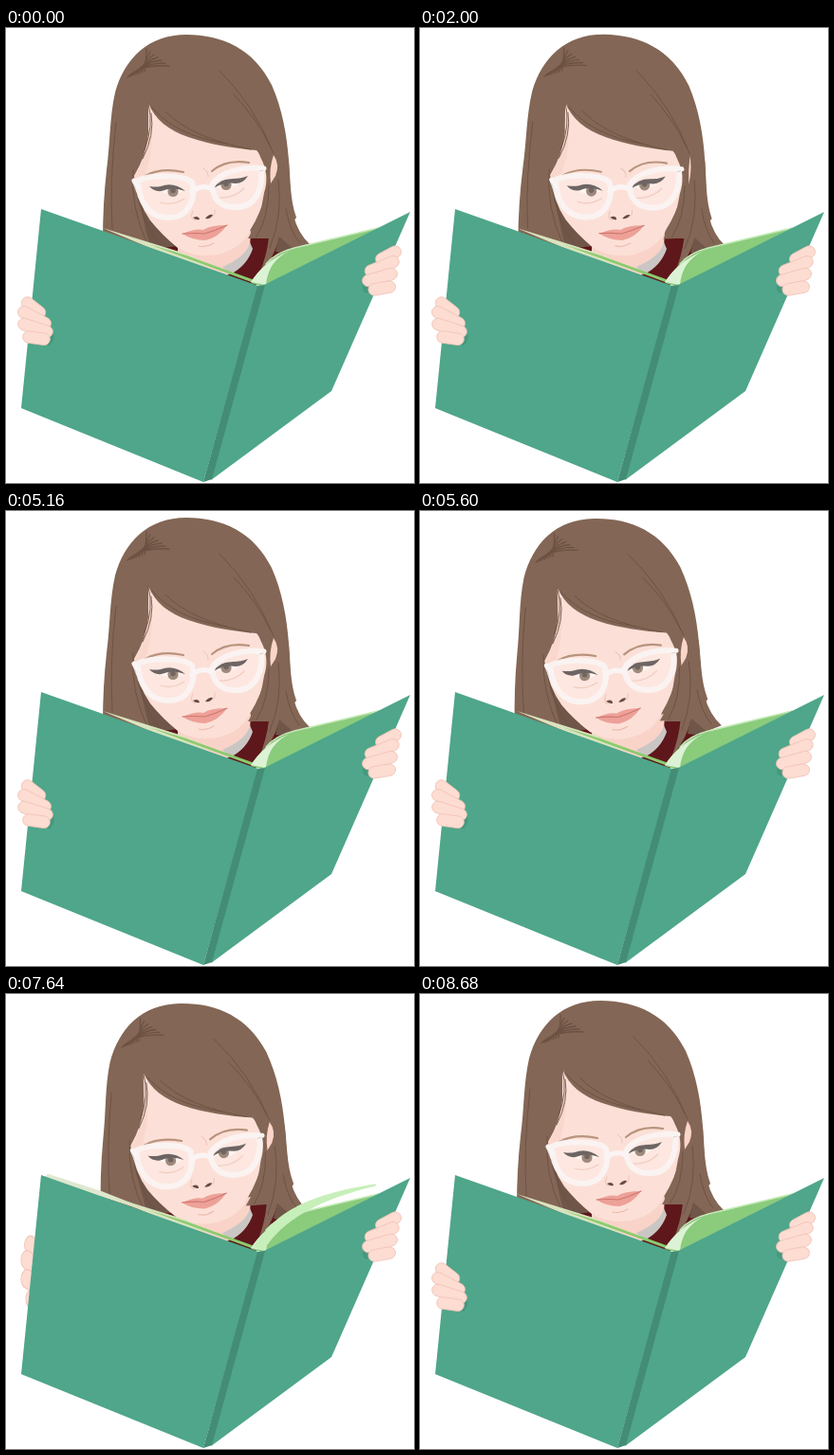
An HTML page that plays this animation: 430x480 px, repeating every 9280 ms.

```html
<!DOCTYPE html>
<html lang="en">
<head>
<meta charset="utf-8">
<title>Girl reading a book</title>
<style>
  html, body { margin: 0; width: 100%; height: 100%; overflow: hidden; background: #fff; }
  svg { display: block; width: 430px; height: 480px; }
  .line { fill: none; stroke-linecap: round; stroke-linejoin: round; }
  .strand { stroke: #6c5143; stroke-width: .9; }
  .frame { fill: #fff; fill-opacity: .22; stroke: #faf5f4; stroke-width: 6; stroke-opacity: .93; stroke-linejoin: round; }
  .finger { fill: #fddcd2; stroke: #f1c3b7; stroke-width: .8; }
  .shadow { fill: #3f8f77; opacity: .6; }
</style>
</head>
<body>
<svg viewBox="0 0 430 480">
  <g id="hairBack">
    <path fill="#836655" d="M190 7C150 7 125 32 115 68C109 95 110 120 106 150Q102 185 102 225L180 262L255 262L306 200C299 180 300 160 298 140C296 112 291 85 280 60C261 22 228 7 190 7Z"/>
    <path fill="#6f5648" d="M139 178L151 228L182 246L182 226Q155 208 139 178Z"/>
    <path class="line strand" d="M134 150Q131 190 149 228M137 165Q141 203 163 231"/>
  </g>

  <path fill="#5e171b" d="M164 232L182 230L182 245ZM226 262L256 222L312 222L300 240L262 272Z"/>
  <path fill="#f9d3c8" d="M181 226L258 214L257 230Q250 248 232 262L181 243Z"/>
  <path fill="#cac6c4" d="M257 226Q254 241 228 252L236 260Q254 251 260 233Z"/>

  <g id="hairFront">
    <path fill="#fce0d7" d="M150 79C157 97 172 108 192 115C215 123 240 127 264 129L270 136Q279 152 275 172Q268 196 258 212Q250 232 223 239Q200 243 181 232Q164 218 152 203Q139 185 135 156Q148 134 150 112Z"/>
    <path fill="#f9d0c5" opacity=".55" d="M135 158Q147 140 150 112L153 100Q157 135 143 165Z"/>
    <path fill="#836655" d="M262 122L269 138Q278 155 272 174Q268 203 255 222L277 221Q275 240 266 262Q283 241 288 222Q296 230 304 234L320 228Q308 217 303 198Q299 175 298 140L290 110Z"/>
    <path fill="#6f5648" d="M288 220L304 234L298 238L284 236Z"/>
    <path id="ear" fill="#fbd5ca" d="M282 134Q289 144 284 156L279 164Q277 148 282 134Z"/>
    <g class="line strand">
      <path id="whorl" stroke-width="1.3"/>
      <path d="M150 79Q156 104 146 128M153 90Q157 113 144 138"/>
      <path d="M154 84Q178 113 232 122M168 88Q195 116 258 128M225 45Q262 82 282 132M240 70Q265 96 279 126"/>
      <path d="M277 166Q277 200 264 220M287 160Q292 198 278 232M295 190Q299 214 309 226M116 100Q109 160 112 212"/>
    </g>
  </g>

  <g id="face">
    <g class="line">
      <path stroke="#b9937d" stroke-width="2.2" d="M147 156Q163 147 187 152M217 151Q232 138 256 142"/>
      <path stroke="#f0c2b5" stroke-width="1" d="M208 148Q214 152 213 157M197 193Q193 201 199 203M220 192Q221 198 217 199"/>
      <path stroke="#edbcae" stroke-width="1.2" d="M163 184Q175 188 188 180M225 179Q240 180 251 169M203 230Q211 232 219 227"/>
    </g>
    <path fill="#fdf0eb" d="M161 171Q174 165 187 172Q175 180 161 171ZM222 168Q232 160 246 163Q237 173 222 168Z"/>
    <g id="eyes">
      <g fill="#826957"><circle cx="176" cy="172.5" r="5.6"/><circle cx="232" cy="165.5" r="5.6"/></g>
      <g fill="#4a3a34"><circle cx="176" cy="171.5" r="2.8"/><circle cx="232" cy="164.5" r="2.8"/></g>
    </g>
    <path fill="#443a38" d="M151 167Q158 168 163 167Q177 162 189 172Q175 167 164 172Q156 173 151 167ZM219 169Q225 159 239 159Q248 159 255 156Q250 164 242 164Q230 162 219 169Z"/>
    <path fill="#6b4a43" d="M197 200Q203 197 204 202Q200 203 197 200ZM210 201Q214 196 218 197Q216 202 210 201Z"/>
    <path fill="#eda198" d="M186 217Q200 211 208 213Q215 208 233 208Q224 221 210 224Q196 224 186 217Z"/>
    <path class="line" stroke="#cf7770" stroke-width="1.2" d="M186 217Q200 216 209 217Q220 214 233 208"/>
    <path class="line" stroke="#dcd8d7" stroke-width="6" d="M136 162L140 172"/>
    <path class="frame" d="M139 161C151 155 187 154 196 163C200 177 195 200 171 200C152 200 140 185 139 161Z"/>
    <path class="frame" d="M217 166C224 152 250 146 269 148C271 166 265 188 244 189C227 190 218 181 217 166Z"/>
    <path class="line" stroke="#faf5f4" stroke-width="5" d="M196 173Q206 164 217 170M135 161L140 168M266 149L272 148"/>
    <path class="line" stroke="#d9d0ce" d="M267 151L271 150"/>
  </g>

  <path id="lift" fill="#dfe8d0" d="M40 193L44 189L100 207L186 241Z"/>
  <path fill="#d9e3bf" d="M102 211L186 237L230 256L180 244Z"/>
  <path fill="#8ccb6e" d="M150 228L190 240L262 266L272 273Z"/>
  <path fill="#8acb7c" d="M258 269Q276 240 302 233L392 211L400 215L272 273Z"/>
  <path class="line" stroke="#c6ebb8" stroke-width="1.4" d="M274 249Q284 237 304 232L392 211"/>
  <path fill="#dcf2d5" d="M258 268Q272 246 299 235Q276 246 274 271Z"/>
  <path id="leaf"/>
  <path id="fold" fill="#d9f1d0" d="M248 268L258 262L270 247L273 271Z"/>

  <g id="handBehind"></g>
  <path fill="#4fa68a" d="M37 191L266 272L208 479L16 401ZM272 271L426 194L343 383L216 477Z"/>
  <path fill="#438c75" d="M265 272L273 271L217 476L208 479Z"/>
  <g id="handFront"><path class="shadow" d="M28 330L46 335Q52 330 50 322Z"/></g>
  <g id="handRight"><path class="shadow" d="M380 264Q373 274 378 279L392 281L392 262Z"/></g>
</svg>

<script>
const LOOP = 9280, STEP = 40;
const $ = id => document.getElementById(id);
const set = (id, name, value) => $(id).setAttribute(name, value);
const move = (id, value) => set(id, 'transform', value);
const show = (id, on) => set(id, 'visibility', on ? 'visible' : 'hidden');

const progress = (t, from, to) => Math.min(1, Math.max(0, (t - from) / (to - from)));
const ramp = (t, from, to) => { const u = progress(t, from, to); return u * u * (3 - 2 * u); };
const bump = (t, from, to) => Math.sin(Math.PI * progress(t, from, to));
const mix = (a, b, u) => a.map((v, i) => v + (b[i] - v) * u);
const add = (a, x, y) => [a[0] + x, a[1] + y];

// Four fingers, the middle two longest; place(i) gives centre and angle.
function addHand(id, place) {
  for (let i = 0; i < 4; i++) {
    const [x, y, angle] = place(i), w = 39 - 4.5 * (i - 1.5) ** 2;
    $(id).innerHTML += `<rect class="finger" x="${-w / 2}" y="-6.3" width="${w}" height="12.6" rx="6.3"
      transform="translate(${x} ${y}) rotate(${angle})"/>`;
  }
}
const leftFinger = i => [29 + i, 295 + 10.7 * i, 38 - 10 * i];
addHand('handBehind', leftFinger);
addHand('handFront', leftFinger);
addHand('handRight', i => [394 + 2.2 * (i - 2) ** 2, 240 + 11.5 * i, 6 * i - 28]);
const index = $('handRight').querySelector('rect');

// Strands fanning out from the parting
let whorl = '';
for (let i = 0; i < 7; i++) whorl += `M${128 + 3 * i} ${52 - i}Q${142 + i} ${38 - i} ${172 - 4 * i} ${40 - 3 * i}`;
set('whorl', 'd', whorl);

function drawHead(t) {
  const back = ramp(t, 7640, 8360);
  const tilt = .7 * (ramp(t, 240, 600) - ramp(t, 3720, 4120)) - 1.2 * (ramp(t, 5160, 5600) - back);
  const drop = 2 * (ramp(t, 6520, 6880) - back) + .5 * (ramp(t, 5160, 5600) - back);
  const gaze = 4 * ramp(t, 1480, 2000) - 3 * ramp(t, 240, 600) - ramp(t, 3720, 4120)
    - ramp(t, 5160, 5600) + ramp(t, 8400, 8680);
  const shift = 4 * Math.max(0, tilt);
  const pose = x => `translate(${x} ${drop}) rotate(${tilt} 210 240)`;
  move('hairBack', pose(1.6 * tilt));
  move('hairFront', pose(1.6 * tilt));
  move('face', pose(shift));
  move('eyes', `translate(${gaze} 0)`);
  move('ear', `translate(282 0) scale(${1 - shift / 4} 1) translate(-282 0)`);
}

// The free corner swings over an arc while the sheet bulges towards the spine.
function drawLeaf(t) {
  const angle = Math.PI * progress(t, 7440, 8360) ** 1.87;
  const cos = Math.cos(angle), sin = Math.sin(angle);
  const corner = [247 + 145 * cos, 212 - 65 * sin];
  const foot = [265 - 27 * sin, 268 - 5 * sin];
  const hinge = [272, 270], end = add(corner, 0, 6 * sin + 1);
  const bulge = Math.min(1, 1 + cos), sag = Math.max(0, cos);
  const near = add(mix(foot, corner, .35), -25 * bulge, -3 * bulge);
  const far = add(mix(foot, corner, .7), -55 * bulge, -5 * bulge);
  const under = [.33, .66].map(u => add(mix(end, hinge, u), -22 * sag, -8 * sag));
  set('leaf', 'd', `M${foot}C${near} ${far} ${corner}L${end}C${under[0]} ${under[1]} ${hinge}Z`);
  set('leaf', 'fill', `rgb(${mix([190, 236, 176], [239, 252, 232], sin).map(Math.round)})`);
  set('fold', 'opacity', sin ** 6);
  show('leaf', t > 7440 && t < 8360);

  const raised = bump(t, 7440, 8000);
  show('lift', raised > .01);
  move('lift', `translate(0 ${8 - 8 * raised})`);
}

// The left hand slips round the cover's edge and hides behind it.
function drawHands(t) {
  const away = ramp(t, 7440, 7800) - ramp(t, 8400, 8680);
  const arc = Math.sin(Math.PI * away);
  const pose = `translate(${42 * away - 22 * arc} 0) translate(0 333) scale(1 ${1 + .6 * arc}) translate(0 -333)`;
  move('handFront', pose);
  move('handBehind', pose);
  show('handFront', away < .35);
  show('handBehind', away >= .35 && away < 1);
  index.setAttribute('transform', `translate(403 240) rotate(${56 * bump(t, 7760, 8320) - 28})`);
}

const start = performance.now();
function tick() {
  const t = Math.floor((performance.now() - start) % LOOP / STEP) * STEP;
  drawHead(t);
  drawLeaf(t);
  drawHands(t);
  requestAnimationFrame(tick);
}
tick();
</script>
</body>
</html>
```
